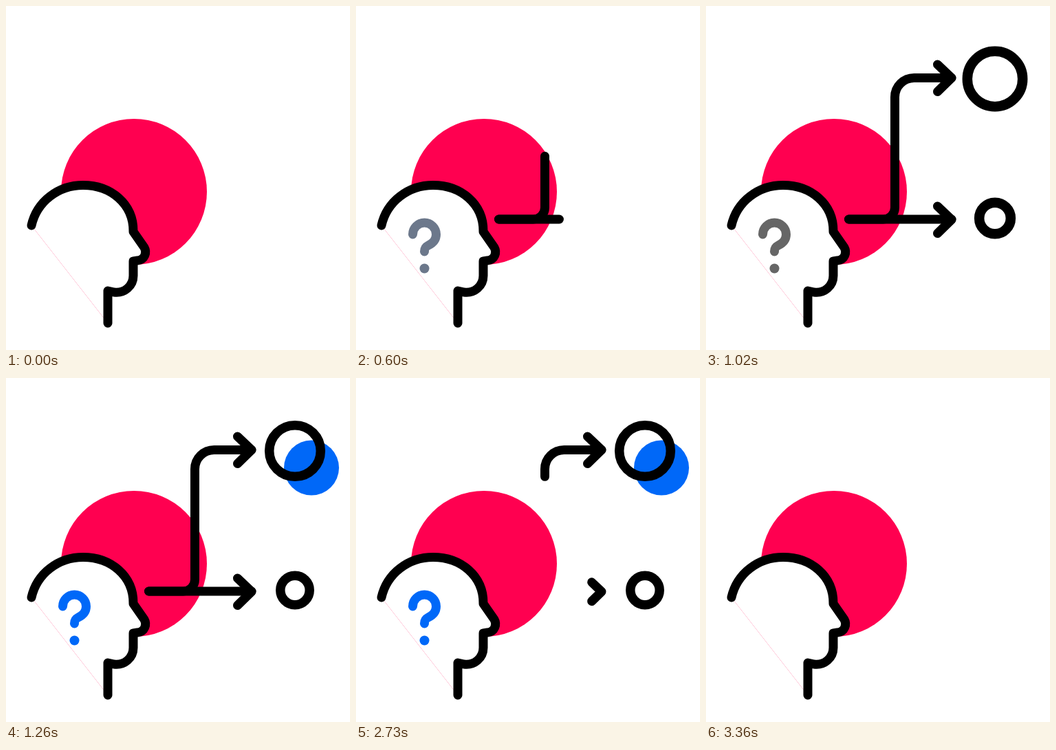
Animation, 500 px wide and 500 px high, one loop 3660 ms. Source, as an HTML page with a canvas:

```html
<!DOCTYPE html>
<html lang="en">
<head>
<meta charset="utf-8">
<title>Decision</title>
<style>
  html, body { margin: 0; width: 100%; height: 100%; overflow: hidden; background: #fff; }
  canvas { display: block; width: 100vmin; height: 100vmin; }
</style>
</head>
<body>
<canvas id="stage" width="500" height="500"></canvas>
<script>
const ctx = document.getElementById('stage').getContext('2d');
const LOOP = 3660, STEP = 30, LINE = 13;
const RED = '#ff0050', BLUE = '#0068f8', BLACK = '#000';

const shape = d => {
  const el = document.createElementNS('http://www.w3.org/2000/svg', 'path');
  el.setAttribute('d', d);
  return { path: new Path2D(d), length: el.getTotalLength() };
};

const head = shape('M37 319C45 284 76 260.5 112 260.5C153 260.5 185 288 185 327V328L201 351' +
  'C205 358 202 369 191 370L185 371V392C185 407 172 418 157 416L148 414V461');
const mark = shape('M82.5 332A17 17 0 0 1 116.5 332C116.5 341 111 345 105 348C101 350 99.5 352 99.5 357');
const upper = shape('M207.5 310H257.5A17 17 0 0 0 274.5 293V132.5A28 28 0 0 1 302.5 104.5H357');
const lower = shape('M207.5 310H357');

const ramp = (t, from, to) => Math.min(1, Math.max(0, (t - from) / (to - from)));
const backOut = u => 1 + 2.70158 * (u - 1) ** 3 + 1.70158 * (u - 1) ** 2;
const grow = (t, inA, inB, outA, outB) =>
  t < outA ? backOut(ramp(t, inA, inB)) : 1 - ramp(t, outA, outB);
const show = (t, inA, inB, outA, outB) => ramp(t, inA, inB) - ramp(t, outA, outB);

// Strokes the part of a path between two fractions of its length.
function trim({ path, length }, from, to, color = BLACK) {
  if (to - from < 0.001) return;
  ctx.strokeStyle = color;
  ctx.setLineDash([(to - from) * length, length * 2]);
  ctx.lineDashOffset = -from * length;
  ctx.stroke(path);
  ctx.setLineDash([]);
}

function disc(x, y, r, color) {
  if (r <= 0) return;
  ctx.fillStyle = color;
  ctx.beginPath();
  ctx.arc(x, y, r, 0, Math.PI * 2);
  ctx.fill();
}

function ring(x, y, r, scale) {
  if (scale <= 0) return;
  ctx.strokeStyle = BLACK;
  ctx.lineWidth = 13.5 * scale;
  ctx.beginPath();
  ctx.arc(x, y, r * scale, 0, Math.PI * 2);
  ctx.stroke();
  ctx.lineWidth = LINE;
}

function arrowHead(y, p) {
  if (p <= 0) return;
  const x = 357 - 20.5 * p;
  ctx.strokeStyle = BLACK;
  ctx.beginPath();
  ctx.moveTo(x, y - 19.5 * p);
  ctx.lineTo(357, y);
  ctx.lineTo(x, y + 20 * p);
  ctx.stroke();
}

function dot(p, color) {
  if (p <= 0) return;
  const start = 265 * Math.PI / 180;
  ctx.fillStyle = color;
  ctx.beginPath();
  if (p < 1) ctx.moveTo(99.5, 381.5);
  ctx.arc(99.5, 381.5, 7, start, start - Math.PI * 2 * p, true);
  ctx.fill();
}

function draw(t) {
  ctx.fillStyle = '#fff';
  ctx.fillRect(0, 0, 500, 500);
  ctx.lineWidth = LINE;
  ctx.lineCap = ctx.lineJoin = 'round';

  disc(186, 270, 106, RED);
  ctx.fill(head.path);
  ctx.fillStyle = '#fff';
  ctx.fill(head.path);
  trim(head, 0, 1);

  const tint = t < 700 ? '#6c788b' : t < 1050 ? '#666' : BLUE;
  trim(mark, 0, show(t, 20, 420, 2980, 3340), tint);
  dot(show(t, 400, 520, 2890, 2992), tint);

  trim(lower, ramp(t, 2420, 2700), ramp(t, 440, 712));
  trim(upper, ramp(t, 2420, 2880), ramp(t, 440, 795));
  arrowHead(310.5, show(t, 712, 800, 2700, 2800));
  arrowHead(104.5, show(t, 794, 900, 2880, 3000));

  disc(444, 130.5, 40 * grow(t, 1040, 1255, 3060, 3340), BLUE);
  ring(420, 106, 37.3, grow(t, 809, 1255, 2980, 3250));
  ring(420, 308.5, 21.2, grow(t, 809, 1255, 2770, 3017));
}

function tick() {
  const t = performance.now() % LOOP;
  draw(Math.floor(t / STEP) * STEP);
  requestAnimationFrame(tick);
}
tick();
</script>
</body>
</html>
```
